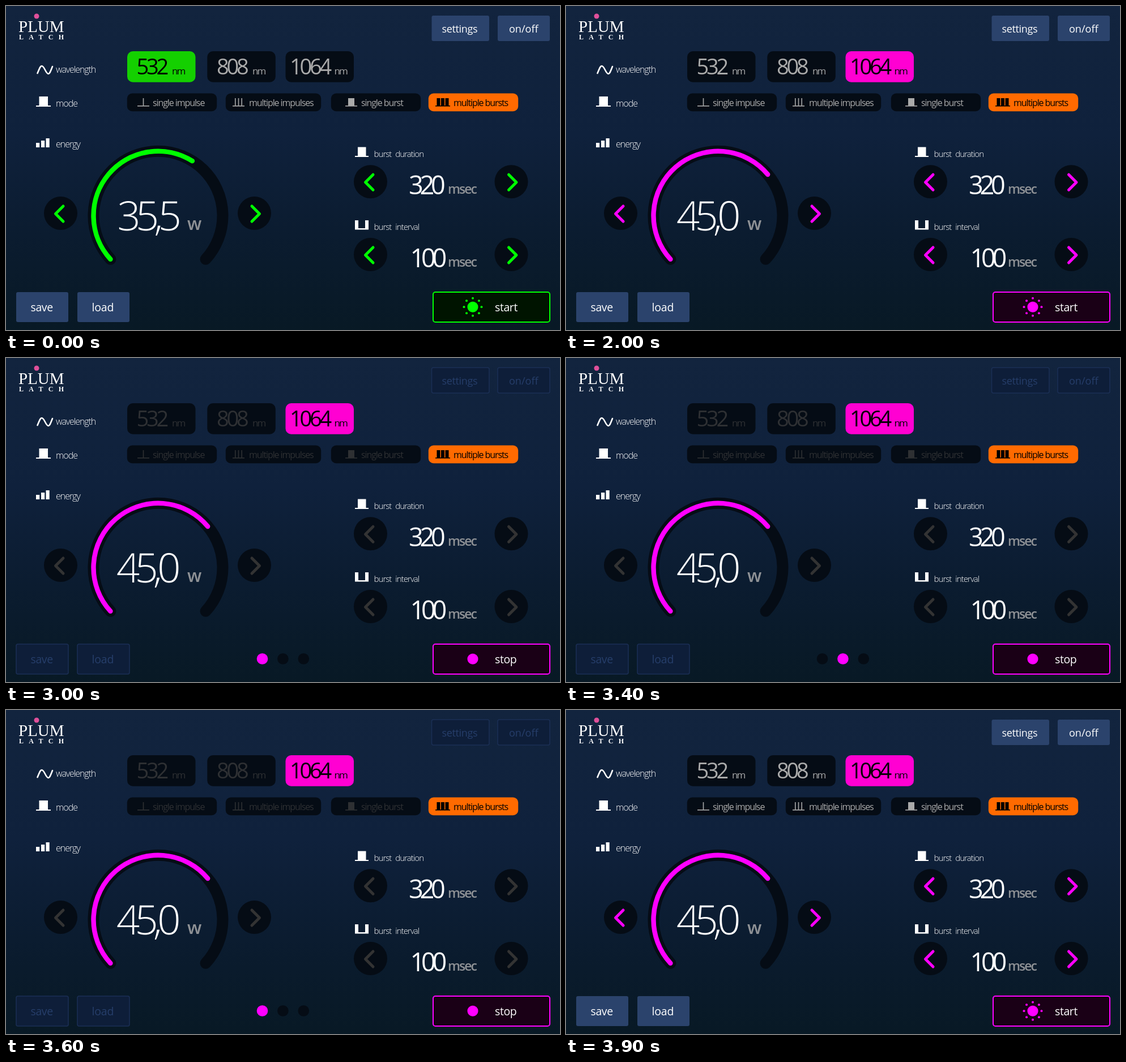
Write an HTML page that moves like this. It is 978 px wide and 573 px high and loops after 4900 ms.

```html
<!DOCTYPE html>
<html lang="en">
<head>
<meta charset="utf-8">
<title>Laser control panel</title>
<style>
html, body { margin: 0; width: 100%; height: 100%; overflow: hidden; background: #0b1a2c; }
svg { display: block; width: 100vw; height: 100vh; }
text { font-family: "Open Sans", "Noto Sans", sans-serif; white-space: pre; }
.logo { font-family: "Liberation Serif", serif; }
</style>
</head>
<body>
<svg id="stage" viewBox="0 0 978 573" preserveAspectRatio="none">
  <defs>
    <linearGradient id="bg" x1="0" y1="0" x2="0" y2="1">
      <stop offset="0" stop-color="#12243e"/>
      <stop offset=".4" stop-color="#0f213c"/>
      <stop offset=".7" stop-color="#0b1c30"/>
      <stop offset="1" stop-color="#081925"/>
    </linearGradient>
  </defs>
  <rect width="978" height="573" fill="url(#bg)"/>
  <g id="ui"></g>
</svg>
<script>
const LOOP = 4900;
const DARK = '#050c15', GREY = '#aaaaaa', DIM = '#2e3033', UNIT = '#8f9296';
const WHITE = '#ffffff', ORANGE = '#ff6a00';
const ui = document.getElementById('ui');

const THEMES = [
  { main: '#00ff00', chip: '#14d000', tint: '#001400', value: '35,5', x: 196.5, end: 32 },
  { main: '#ff0000', chip: '#ff0000', tint: '#180000', value: '26,5', x: 196.5, end: -7.3 },
  { main: '#ff00ff', chip: '#ff00d2', tint: '#1a0016', value: '45,0', x: 195, end: 50.3 }
];

// Mode chips: left, width, icon kind, icon x, label x, label
const FULL = [
  [214, 158, 'spike', 232, 259, 'single impulse'],
  [388, 168, 'spikes', 400, 429, 'multiple impulses'],
  [574, 158, 'burst', 599, 627, 'single burst'],
  [746, 158, 'bursts', 758, 790, 'multiple bursts']
];
const SHORT = [
  [214, 139, 'spike', 232, 259, 'single imp.'],
  [372, 139, 'spikes', 384, 413, 'multiple imp.'],
  [530, 120, 'burst', 545, 573, 'single brs.'],
  [669, 117, 'block', 682, 714, 'constant'],
  [805, 136, 'bursts', 817, 849, 'multiple brs.']
];

const text = (x, y, str, size, gap = 0, fill = WHITE, weight = 350, extra = '') =>
  `<text x="${x}" y="${y}" font-size="${size}" letter-spacing="${gap}" fill="${fill}" font-weight="${weight}" ${extra}>${str}</text>`;
const rect = (x, y, w, h, fill, rx = 0, extra = '') =>
  `<rect x="${x}" y="${y}" width="${w}" height="${h}" rx="${rx}" fill="${fill}" ${extra}/>`;
const disc = (x, y, r, fill) => `<circle cx="${x}" cy="${y}" r="${r}" fill="${fill}"/>`;
const line = (d, stroke, width) =>
  `<path d="${d}" fill="none" stroke="${stroke}" stroke-width="${width}" stroke-linecap="round" stroke-linejoin="round"/>`;

function icon(kind, x, fill) {
  const bars = (xs, w) => xs.map(dx => rect(x + dx, 163, w, 14, fill)).join('');
  const base = w => rect(x, 176, w, 1.6, fill);
  switch (kind) {
    case 'spike': return base(21) + bars([9.7], 1.6);
    case 'spikes': return base(21) + bars([4, 9.7, 15.4], 1.6);
    case 'burst': return base(21) + bars([5], 11);
    case 'bursts': return base(26) + bars([2.5, 10, 17.5], 6);
    default: return rect(x, 162.5, 23, 14.5, fill);
  }
}

function button(x, y, w, h, label, tx, ty, size, gap, off) {
  return rect(x, y, w, h, off ? '#0e1e39' : '#2b436c', 3, off ? 'stroke="#1b2f55" stroke-width="1.5"' : '')
    + text(tx, ty, label, size, gap, off ? '#263e6a' : WHITE, 400);
}

function arrow(x, y, dir, color) {
  const a = x - 4.5 * dir, b = x + 9 * dir;
  return disc(x, y, 29.5, DARK)
    + line(`M${a} ${y - 12.5}L${b} ${y + 1}L${a} ${y + 14.5}`, color, 5);
}

const arrows = (x1, x2, y, color) => arrow(x1, y, -1, color) + arrow(x2, y, 1, color);

// Angles run clockwise from the top of the dial
function arc(to, color, width) {
  const from = -132.5, r = 114;
  const at = deg => {
    const a = deg * Math.PI / 180;
    return `${268.5 + r * Math.sin(a)} ${370.8 - r * Math.cos(a)}`;
  };
  return line(`M${at(from)}A${r} ${r} 0 ${to - from > 180 ? 1 : 0} 1 ${at(to)}`, color, width);
}

function header(off) {
  return disc(54, 18, 4.5, '#e0509a')
    + text(22, 46, 'PLUM', 29, 0, WHITE, 400, 'class="logo"')
    + text(23, 59, 'LATCH', 12, 9.3, WHITE, 700, 'class="logo"')
    + button(751.5, 17, 101.5, 45, 'settings', 769.5, 47, 18, -.35, off)
    + button(868, 17, 92, 45, 'on/off', 888, 47, 18, 0, off);
}

function labels() {
  return line('M55.500 119C60 108 61 106 63 106S67 109 69 113S73 120 75 120S78 117 82 107', WHITE, 2.6)
    + text(88, 118, 'wavelength', 16, -1.1)
    + rect(53, 176, 26, 2, WHITE) + rect(58.5, 160, 15.5, 17, WHITE)
    + text(88, 178, 'mode', 16, -.9)
    + [[53, 8], [62, 12], [70.5, 16]].map(([x, h]) => rect(x, 250 - h, 6.2, h, WHITE)).join('')
    + text(88, 250, 'energy', 16, -1);
}

function wavelengths(active, off) {
  return [[214, '532', 230.5, 293], [355.3, '808', 372, 435], [493.5, '1064', 501, 579.5]].map(([x, n, nx, ux], i) => {
    const on = i === active, fill = on ? '#000000' : off ? DIM : GREY;
    return rect(x, 80, 120.5, 54.7, on ? THEMES[i].chip : DARK, 10)
      + text(nx, 121, n, 38, -4.2, fill, 400) + text(ux, 121, 'nm', 17, -1.9, fill, 400);
  }).join('');
}

function modes(list, off) {
  return list.map(([x, w, kind, ix, tx, label], i) => {
    const on = i === 3, fill = on ? '#000000' : off ? DIM : GREY;
    return rect(x - .2, 154.6, w + .4, 31.6, on ? ORANGE : DARK, 9) + icon(kind, ix, fill)
      + text(tx, 177, label, 16, -1.1, fill, 400);
  }).join('');
}

function setting(y, name, value, x, color) {
  return text(649.5, y, name, 15, -.95, WHITE, 350, 'word-spacing="4"')
    + arrows(643.5, 892, y + 44, color)
    + text(x, y + 66, value, 45, -6.2, WHITE, 400)
    + text(780, y + 65, 'msec', 23, -2, UNIT, 600);
}

function bursts(color) {
  return rect(616, 265, 24, 2, WHITE) + rect(621, 249.5, 14.5, 16, WHITE)
    + setting(266.7, 'burst duration', '320', 711, color)
    + `<path d="M616 379h6v14h12v-14h6v16.500h-24z" fill="${WHITE}"/>`
    + setting(395.5, 'burst interval', '100', 713.5, color);
}

function footer(theme, off, dot) {
  let out = button(18, 506, 92, 53, 'save', 43.5, 540, 19.5, -.4, off)
    + button(126, 506, 92, 53, 'load', 151.5, 540, 19.5, -.2, off)
    + rect(754, 506, 206, 53, theme.tint, 4, `stroke="${theme.main}" stroke-width="2"`)
    + disc(824, 532.3, 9.5, theme.main)
    + text(863, 540, off ? 'stop' : 'start', 19.5, -.4, WHITE, 400);
  if (off) {
    for (let i = 0; i < 3; i++) out += disc(452.5 + 36.4 * i, 532, 9.8, i === dot ? theme.main : DARK);
  } else {
    for (let i = 0; i < 8; i++) {
      const a = i * Math.PI / 4;
      out += disc(824 + 15.5 * Math.cos(a), 532.3 + 15.5 * Math.sin(a), 2, theme.main);
    }
  }
  return out;
}

function panel(active, dot) {
  const theme = THEMES[active], off = dot >= 0;
  const color = off ? '#333333' : theme.main;
  return header(off) + labels() + wavelengths(active, off)
    + modes(active === 1 ? SHORT : FULL, off)
    + arc(132.5, DARK, 20) + arc(theme.end, theme.main, 8.4)
    + arrows(96.5, 438.5, 366.5, color)
    + text(theme.x, 397, theme.value, 72, -8.5)
    + text(320, 396, 'w', 31, 0, UNIT, 600)
    + (active === 1 ? '' : bursts(color))
    + footer(theme, off, dot);
}

let shown = '';
function draw(now) {
  const t = now % LOOP;
  const active = Math.min(2, Math.floor(t / 1000));
  const dot = t >= 3000 && t < 3900 ? Math.floor((t - 3000) / 100) % 3 : -1;
  const key = active + ':' + dot;
  if (key !== shown) {
    shown = key;
    ui.innerHTML = panel(active, dot);
  }
}

const start = performance.now();
function tick() {
  draw(performance.now() - start);
  requestAnimationFrame(tick);
}
tick();
</script>
</body>
</html>
```
